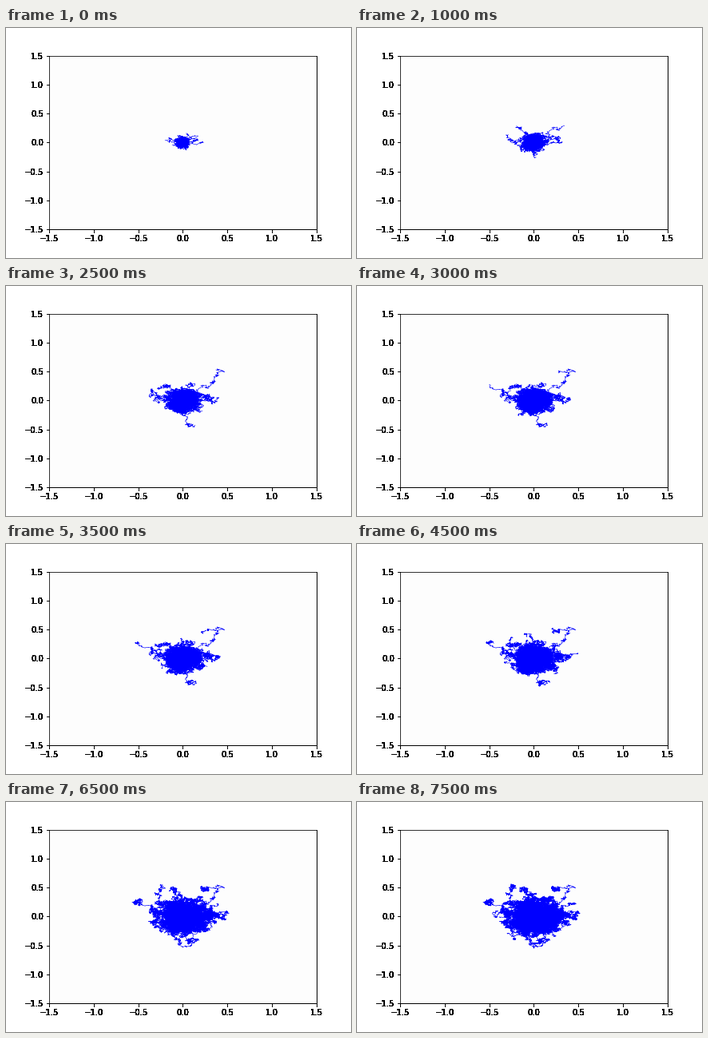
These frames come from a looping animation (432 px wide and 288 px high, 8000 ms). A matplotlib script:

```python
import matplotlib.pyplot as plt
import numpy as np
from matplotlib.animation import FuncAnimation

FRAMES, STEPS, WALKERS = 16, 25, 150
SIGMA = 0.01  # spread of one step
RECT = [0.125, 0.125, 0.775, 0.755]
TICKS = np.arange(-1.5, 1.6, 0.5)

# Farthest points reached: x, y, arrival in frames
TIPS = [(-.36, .10, 6), (-.45, .26, 10), (-.26, .48, 12), (-.12, .47, 12),
        (.10, .27, 4), (.23, .45, 12), (.29, .02, 4), (.48, .06, 11),
        (.43, .22, 15), (.07, -.45, 9)]

rng = np.random.default_rng(7)
time = np.arange(FRAMES * STEPS + 1) / STEPS


def walks(count):
    """Brownian paths from the centre, shaped (count, time, 2)."""
    steps = rng.normal(0, SIGMA, (count, len(time), 2))
    steps[:, 0] = 0
    return steps.cumsum(axis=1)


def wander_to(x, y, arrival):
    """Noisy path that spreads out to a point, then lingers there."""
    noise = walks(1)[0]
    end = np.zeros(2)
    knots = [0, arrival, FRAMES]
    progress = np.minimum(np.sqrt(time / arrival), 1)
    path = noise + progress[:, None] * (x, y)
    at = [k * STEPS for k in knots]
    for axis in range(2):
        path[:, axis] -= np.interp(time, knots, noise[at, axis])
    return path


cloud = walks(4000)
reach = 0.02 + 0.115 * np.sqrt(time)
inside = (np.hypot(cloud[..., 0], cloud[..., 1]) <= reach).all(axis=1)
paths = list(cloud[inside][:WALKERS]) + [wander_to(*tip) for tip in TIPS]

fig = plt.figure(figsize=(6, 4), dpi=72, facecolor="white")


def add_axes(name, face):
    ax = fig.add_axes(RECT, label=name, facecolor=face)
    ax.set(xlim=(-1.5, 1.5), ylim=(-1.5, 1.5), xticks=TICKS, yticks=TICKS)
    ax.tick_params(labelsize=10)
    return ax


ax = add_axes("plot", "#fdfdfd")
for i in range(16):  # stacked copies give the heavy labels
    overlay = add_axes(f"overlay {i}", "none")
    overlay.spines[["left", "top"]].set_visible(False)

lines = [ax.plot([], [], color="blue", lw=0.6)[0] for _ in paths]


def update(frame):
    end = (frame + 1) * STEPS + 1
    for line, path in zip(lines, paths):
        line.set_data(path[:end, 0], path[:end, 1])
    return lines


anim = FuncAnimation(fig, update, frames=FRAMES, interval=500,
                     repeat=True, repeat_delay=0)
plt.show()
```
